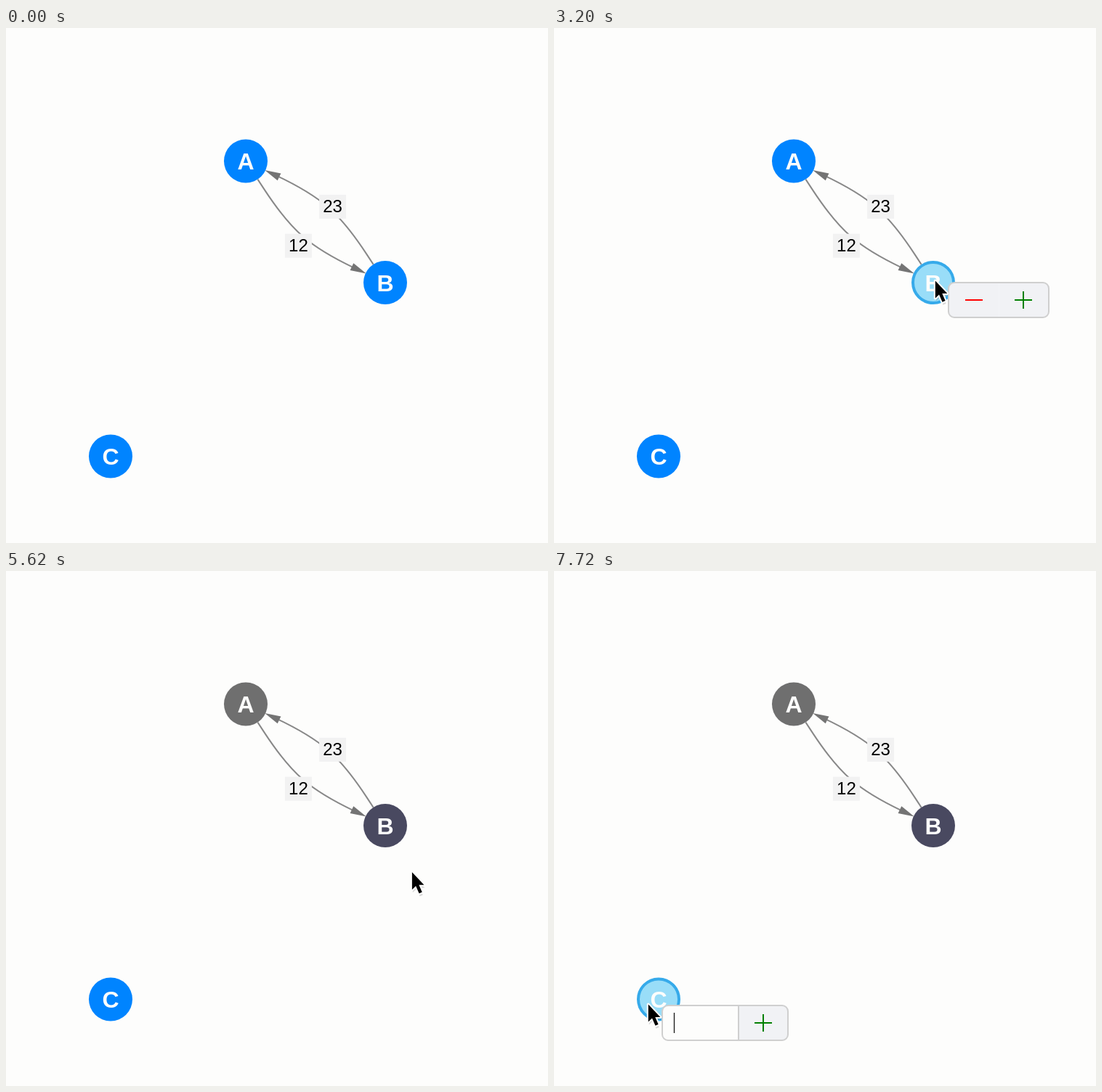
Write an HTML page that moves like this. It is 746 by 710 pixels and loops after 8 s.

```html
<!DOCTYPE html>
<html lang="en">
<head>
<meta charset="utf-8">
<title>Node graph</title>
<style>
  html, body { margin: 0; width: 100%; height: 100%; overflow: hidden; background: #fdfdfc; }
  svg { display: block; width: 746px; height: 710px; font-family: "Liberation Sans", Arial, sans-serif; text-anchor: middle; }
  .edge { fill: none; stroke: #888; stroke-width: 2; }
  .tip { fill: #747474; }
  .tag { fill: #f2f2f2; }
  .value { font-size: 24px; }
  .node circle { fill: #0084ff; }
  .node text { font-size: 32px; font-weight: bold; fill: #fdfdfc; }
  .node.grey circle { fill: #6f6f6f; }
  .node.dark circle { fill: #494960; }
  .node.lit circle { fill: #99ddf8; stroke: #36aaea; stroke-width: 4; r: 28px; }
  .frame { fill: none; stroke: #cfcfcf; stroke-width: 2; }
  .button { fill: #f1f2f5; }
  .awake .button { fill: #fdfdfc; }
  .awake .button.over { fill: #cfcfcf; }
  .field { fill: #fdfdfc; }
  .line { fill: none; stroke-width: 2; }
  .plus { stroke: #008000; }
  .minus { stroke: #f00; }
  .caret { stroke: #222; stroke-width: 1.4; }
  .shadow { fill: #666; opacity: .25; }
</style>
</head>
<body>
<svg viewBox="0 0 746 710">
  <defs>
    <path id="plus" class="line plus" d="M-12 0H12M0-12V12"/>
    <path id="arrowShape" d="M.8 .5V24.500L6 19.500L10.500 29.800L14.600 28L10.300 18H17.300Z"/>
    <path id="handShape" d="M-10.3 2C-11.3-2.8-6.3-3-5 1L-2.2 9C-1.2 6.6 3 6.6 4 9.4C5.2 7.2 8.8 7.8 9.2 10.8C11 8.8 13.3 10.3 12.6 14C12.3 20 10.5 22 9.5 26L9.7 30.2H5.5L4 28.2L2 30.2H-5.2C-6.2 26-13.5 20-15.6 16C-16.6 12.5-12.5 11.4-9.2 15.2L-6.6 17.6Z"/>
    <clipPath id="clipB"><rect x="543" y="351" width="138" height="48" rx="8"/></clipPath>
    <clipPath id="clipC"><rect x="149" y="599" width="173" height="48" rx="8"/></clipPath>
  </defs>
  <g id="graph"></g>
  <g id="menuB">
    <g clip-path="url(#clipB)">
      <rect class="button" id="less" x="543" y="351" width="69.500" height="48"/>
      <rect class="button" id="more" x="612.500" y="351" width="69" height="48"/>
    </g>
    <rect class="frame" x="543" y="351" width="138" height="48" rx="8"/>
    <path class="line minus" d="M566 375H590"/>
    <use href="#plus" x="646" y="375"/>
  </g>
  <g id="menuC">
    <g clip-path="url(#clipC)">
      <rect class="field" x="149" y="599" width="105" height="48"/>
      <rect class="button" x="254" y="599" width="68" height="48"/>
    </g>
    <rect class="frame" x="149" y="599" width="173" height="48" rx="8"/>
    <path class="frame" d="M254 599V647"/>
    <path class="caret" d="M165.500 609V637"/>
    <use href="#plus" x="288" y="623"/>
  </g>
  <g id="cursor">
    <g id="arrow">
      <use class="shadow" href="#arrowShape" x="1" y="4"/>
      <use href="#arrowShape" stroke="#fdfdfc" stroke-width="4" stroke-linejoin="round"/>
      <use href="#arrowShape"/>
    </g>
    <g id="hand">
      <use class="shadow" href="#handShape" x="1" y="3" stroke="#666" stroke-width="2"/>
      <use href="#handShape" fill="#fdfdfc" stroke="#000" stroke-width="2" stroke-linejoin="round"/>
      <path d="M-1.500 16V25M2.500 16V25M6.500 16V25" stroke="#000" stroke-width="1.800"/>
    </g>
  </g>
</svg>
<script>
  const LOOP = 8000, RADIUS = 30;
  const OPEN_B = 2540, WAKE_B = 3460, CLOSE_B = 4740, OPEN_C = 7260;
  const $ = id => document.getElementById(id);
  const nodes = { A: [330, 183.5], B: [522, 351], C: [144, 590.5] };

  // Point on the rim of a node, on the side facing q
  function rim([x, y], q) {
    const angle = Math.atan2(q[1] - y, q[0] - x);
    return [x + RADIUS * Math.cos(angle), y + RADIUS * Math.sin(angle)];
  }

  const mix = (p, q, k) => p.map((v, i) => v + (q[i] - v) * k);

  const tag = (text, [x, y]) => `<rect class="tag" x="${x - 18.5}" y="${y - 10.5}" width="37" height="33"/>
    <text class="value" x="${x}" y="${y + 14}">${text}</text>`;

  // B-spline with one inner control point, ending in an arrowhead
  function edge(from, bend, to) {
    const a = rim(from, bend), b = rim(to, bend);
    const mid = a.map((v, i) => (v + 4 * bend[i] + b[i]) / 6);
    const path = `M${a}L${mix(a, bend, 1 / 6)}C${mix(a, bend, 1 / 3)} ${mix(a, bend, 2 / 3)} ${mid}`
      + `C${mix(bend, b, 1 / 3)} ${mix(bend, b, 2 / 3)} ${mix(bend, b, 5 / 6)}L${mix(b, bend, .1)}`;
    const turn = Math.atan2(b[1] - bend[1], b[0] - bend[0]) * 180 / Math.PI;
    return `<path class="edge" d="${path}"/>
      <path class="tip" d="M1 0L-21-5.5V5.5Z" transform="translate(${b}) rotate(${turn})"/>`;
  }

  const node = ([name, [x, y]]) => `<g class="node" id="node${name}">
    <circle cx="${x}" cy="${y}" r="${RADIUS}"/><text x="${x}" y="${y + 11.5}">${name}</text></g>`;

  const bendAB = [402.4, 294.2], bendBA = [449.6, 240.3];
  $('graph').innerHTML = edge(nodes.A, bendAB, nodes.B) + edge(nodes.B, bendBA, nodes.A)
    + tag(12, bendAB) + tag(23, bendBA)
    + Object.entries(nodes).map(node).join('');

  // Pointer stops: time, x, y
  const stops = [
    [900, 505, 718], [1640, 527, 358], [1720, 527, 358], [2040, 524, 348],
    [3460, 524, 348], [3780, 647, 380], [5430, 647, 380], [6140, 148, 575],
    [6420, 148, 575], [6740, 129, 597], [LOOP, 129, 597]
  ];
  const ease = k => k * k * (3 - 2 * k);

  function pointerAt(t) {
    const i = stops.findIndex(s => s[0] > t);
    if (i < 1) return stops[0].slice(1);
    const [t0, ...p] = stops[i - 1], [t1, ...q] = stops[i];
    return mix(p, q, ease((t - t0) / (t1 - t0)));
  }

  const show = (id, on) => $(id).style.display = on ? '' : 'none';

  function draw(t) {
    const [x, y] = pointerAt(t);
    const menuB = t >= OPEN_B && t < CLOSE_B, menuC = t >= OPEN_C, done = t >= CLOSE_B;
    const near = name => Math.hypot(x - nodes[name][0], y - nodes[name][1]) < RADIUS;
    const inMenu = menuB && x > 543 && y > 351;
    const lit = { A: false, B: menuB || near('B'), C: menuC || near('C') };

    for (const name in nodes) $('node' + name).classList.toggle('lit', lit[name]);
    $('nodeA').classList.toggle('grey', done);
    $('nodeB').classList.toggle('dark', done);

    show('menuB', menuB);
    show('menuC', menuC);
    $('menuB').classList.toggle('awake', t >= WAKE_B);
    $('less').classList.toggle('over', inMenu && x <= 612);
    $('more').classList.toggle('over', inMenu && x > 612);

    const hand = inMenu || (!menuB && !menuC && (lit.B || lit.C));
    show('cursor', t >= stops[0][0]);
    show('hand', hand);
    show('arrow', !hand);
    $('cursor').setAttribute('transform', `translate(${x} ${y})`);
  }

  function tick() {
    draw(performance.now() % LOOP);
    requestAnimationFrame(tick);
  }
  tick();
</script>
</body>
</html>
```
